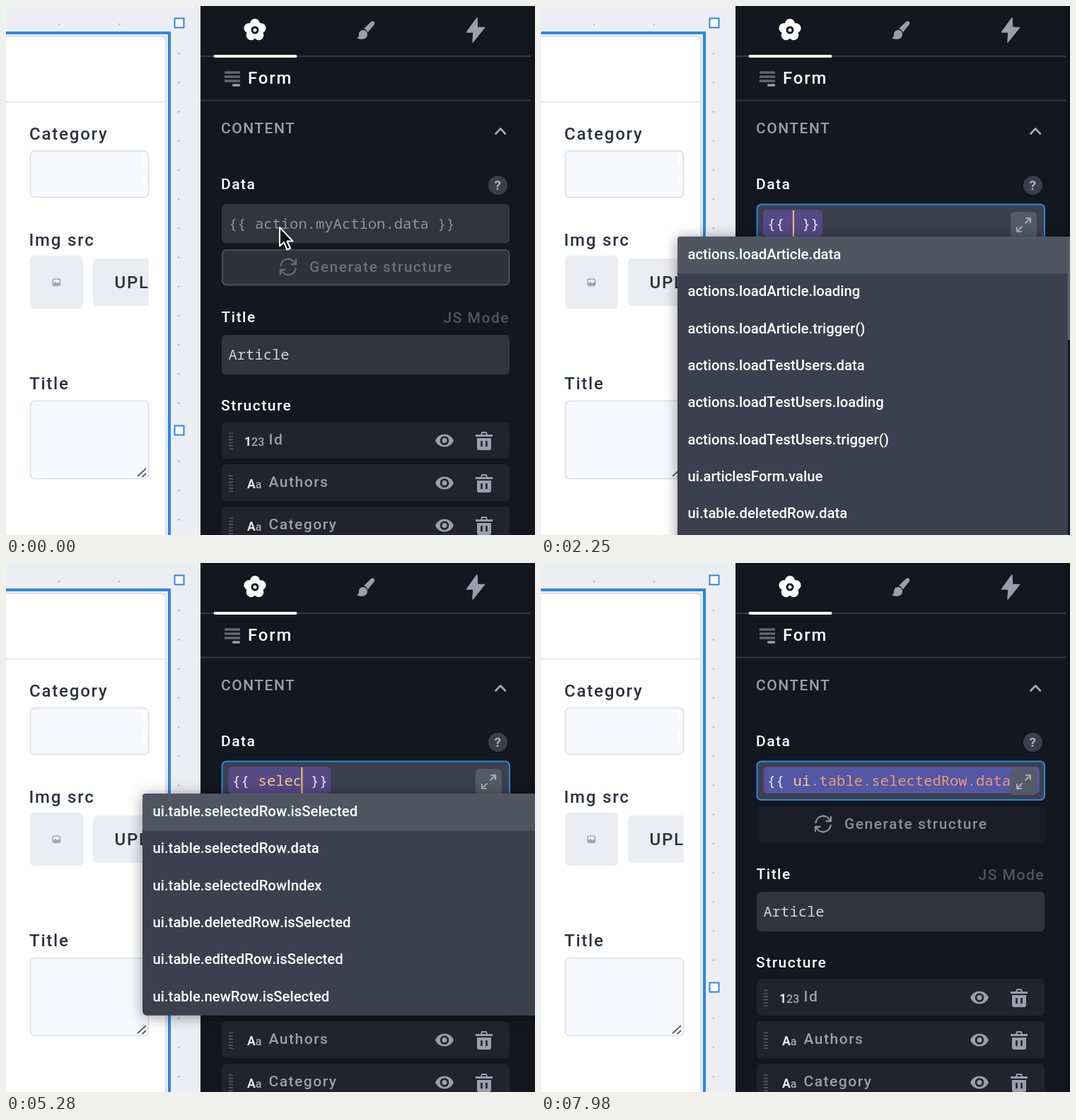
These frames come from a looping animation (748x748 px, 8000 ms). An HTML page:

```html
<!DOCTYPE html>
<html lang="en">
<head>
<meta charset="utf-8">
<title>Form settings</title>
<style>
html, body { margin: 0; height: 100%; overflow: hidden; background: #14171f }
svg { display: block; width: 100vw; height: 100vh }
text { font: 500 21px Roboto, sans-serif; letter-spacing: 1.5px; white-space: pre }
.label { font-size: 24px; letter-spacing: 1.8px; fill: #2d3140 }
.white { fill: #fff }
.grey { fill: #9a9eae }
.code { font: 400 20.5px "Roboto Mono", "Noto Sans Mono", monospace; letter-spacing: 0 }
.type { font-size: 17.5px; font-weight: 700; letter-spacing: 0; fill: #e9eaf0 }
.type tspan { font-size: 16px; font-weight: 500; fill: #a5a8b4 }
.item { font-size: 20.3px; letter-spacing: 0; font-kerning: none; fill: #fff }
.line { fill: none; stroke-linecap: round; stroke-linejoin: round }
.var { fill: #f3c97d }
.prop { fill: #eb9a76 }
.dot { fill: #b9a0a8 }
#shade { filter: blur(10px) }
</style>
</head>
<body>
<svg viewBox="0 0 748 748">
  <defs>
    <g id="handle"><rect x="-6.5" y="-6.5" width="13" height="13" fill="#fff" stroke="#2b87e3" stroke-width="2"/></g>
    <g id="eye">
      <path d="M-13 0C-8-12 8-12 13 0C8 12-8 12-13 0Z" fill="#9a9eae"/>
      <circle r="5" fill="#9a9eae" stroke="#21242d" stroke-width="2.6"/>
    </g>
    <g id="trash" fill="#9a9eae">
      <path d="M-12-9h7l1.5-4h7l1.5 4h7v3h-24zM-10-4h20v14q0 3-3 3h-14q-3 0-3-3z"/>
      <path d="M-3.5 0v8M3.5 0v8" stroke="#21242d" stroke-width="2.6"/>
      <path d="M-3-9l1-2h4l1 2z" fill="#21242d"/>
    </g>
    <clipPath id="fields"><rect width="202" height="748"/></clipPath>
  </defs>

  <!-- page canvas -->
  <rect width="275" height="748" fill="#edeef3"/>
  <g id="dots" fill="#bfc2cc"></g>
  <rect x="-10" y="43" width="236" height="720" rx="6" fill="#fff" stroke="#d5d8e2" stroke-width="1.5"/>
  <path d="M0 135.5H225" stroke="#e5e7ed" stroke-width="2"/>
  <path d="M0 38H231V748" fill="none" stroke="#2b87e3" stroke-width="4"/>
  <use href="#handle" x="245" y="24"/>
  <use href="#handle" x="245" y="600"/>
  <text class="label" x="33" y="189">Category</text>
  <text class="label" x="32.5" y="338.5">Img src</text>
  <text class="label" x="33" y="542">Title</text>
  <g fill="#f8f9fe" stroke="#dadeeb" stroke-width="1.6">
    <rect x="34.5" y="205" width="167" height="65.5" rx="6"/>
    <rect x="34.5" y="558.5" width="167" height="110" rx="6"/>
  </g>
  <path d="M195 208v17M195 238v17" stroke="#fff" stroke-width="3"/>
  <path d="M186 665l12-11M192.5 666l5.500-5" stroke="#555962" stroke-width="1.7"/>
  <g clip-path="url(#fields)">
    <rect x="34" y="353" width="75" height="75" rx="6" fill="#ecedf3"/>
    <rect x="123" y="357" width="100" height="67" rx="6" fill="#ecedf3"/>
    <text class="label" x="153.5" y="399">UPL</text>
  </g>
  <rect x="66" y="386" width="10.5" height="9.5" rx="2.5" fill="none" stroke="#a3a7b4" stroke-width="1.5"/>
  <path d="M66 393l3.5-3 3 2 4-2v5h-10z" fill="#a3a7b4"/>

  <!-- settings panel -->
  <rect x="275" width="473" height="748" fill="#14171f"/>
  <rect x="742" width="6" height="748" fill="#11141b"/>
  <path d="M275 71H742M275 133.5H742" stroke="#343842" stroke-width="2"/>
  <rect x="293.5" y="69" width="118" height="4" rx="2" fill="#fff"/>
  <g id="flower" transform="translate(352 34)" fill="#fff"><circle r="12"/></g>
  <circle cx="352" cy="34" r="4" fill="#fff" stroke="#14171f" stroke-width="3"/>
  <g fill="#9a9eae">
    <path d="M496 45c3-1 3-3 3-5c0-4 3-6 6-6c4 0 6 3 6 6c0 5-4 7-8 7c-3 0-6-1-7-2z"/>
    <path d="M506 32l10.5-10q2-1.500 4 .5q1.500 2 0 4l-9 11q-1-4-5.500-5.500z"/>
    <path d="M666 17l-14.5 20h9.5l-1 14l16.5-20.5h-10z" stroke="#9a9eae" stroke-width="1.5" stroke-linejoin="round"/>
  </g>
  <path d="M309 94h22M309 100h22M309 106h22" stroke="#626672" stroke-width="3.4"/>
  <path d="M321.5 112h8" class="line" stroke="#9a9eae" stroke-width="3.4"/>
  <text class="label" x="342" y="110" style="fill:#fff">Form</text>
  <text class="grey" x="304" y="179.5">CONTENT</text>
  <path class="line" d="M692.5 180.5l6.7-7l6.7 7" stroke="#a5a9b6" stroke-width="2.7"/>
  <text class="white" x="304" y="259">Data</text>
  <circle cx="695.5" cy="253.5" r="13.5" fill="#3b3f4b"/>
  <text x="690.5" y="260" fill="#adb1be" style="font-size:19px;font-weight:700;letter-spacing:0">?</text>

  <g id="generate">
    <rect x="306" y="345" width="405.5" height="49.5" rx="6" stroke-width="2"/>
    <path class="line" d="M388.5 367a10.5 10.5 0 0 1 20-3m1.5-5v6h-6.5M409.5 371a10.5 10.5 0 0 1-20 3m-1.5 5v-6h6.5" stroke-width="2.4"/>
    <text x="429" y="375.5">Generate structure</text>
  </g>

  <text class="white" x="304.5" y="447">Title</text>
  <text x="618.5" y="448" fill="#50545f">JS Mode</text>
  <rect x="305" y="465" width="407" height="56" rx="6" fill="#32353f"/>
  <text class="code" x="314.5" y="500" fill="#d2d3d8">Article</text>
  <text class="white" x="304" y="571.5">Structure</text>
  <g id="rows"></g>

  <!-- data field -->
  <rect id="field" x="305" y="280" width="407" height="55.5" rx="6"/>
  <rect id="outline" x="305.5" y="280.5" width="406.5" height="54.5" rx="6" fill="none" stroke="#2b87e3" stroke-width="2"/>
  <text id="hint" class="code" x="315" y="315" fill="#8f929e">{{ action.myAction.data }}</text>
  <g id="chip">
    <rect id="pill" x="314" y="288" height="38" rx="6" fill="#564a86"/>
    <rect id="marked" x="317" y="289" width="387" height="36" rx="3" fill="#5457a4"/>
    <text id="value" class="code" x="319.7" y="315" fill="#ebe8f3"></text>
  </g>
  <rect id="caret" y="289" width="2" height="37" fill="#f4c56a"/>
  <g id="expand">
    <rect x="664" y="291" width="37" height="37" rx="6" fill="#555a66"/>
    <path class="line" d="M685 307l7-7m-6 0h6v6M680 312l-7 7m6 0h-6v-6" stroke="#a5a9b5" stroke-width="2.2"/>
  </g>

  <g id="menu">
    <rect id="shade" x="193" y="328" width="570" opacity=".4"/>
    <rect id="sheet" x="193" y="326" width="570" rx="6" fill="#3c404e"/>
    <rect id="active" x="193" width="570" height="52.5" rx="4" fill="#505562"/>
    <g id="items"></g>
    <g id="scroll">
      <rect x="745" y="326" width="3" height="422" fill="#14171f"/>
      <rect x="744.5" y="326" width="4" height="146" fill="#5a5e6a"/>
    </g>
  </g>

  <circle id="ring" cx="386" cy="315" fill="none" stroke="#c8c9ce" stroke-width="6"/>
  <path id="pointer" d="M387 313v26.5l6-5.500 4.500 10.500 4.500-2-4.500-10h8z" fill="#0b0c10" stroke="#fff" stroke-width="2" stroke-linejoin="round"/>
</svg>
<script>
const $ = id => document.getElementById(id);
const set = (id, attrs) => { for (const k in attrs) $(id).setAttribute(k, attrs[k]); };
const show = (id, on) => { $(id).style.display = on ? '' : 'none'; };
const ramp = (t, from, to) => Math.min(1, Math.max(0, (t - from) / (to - from)));

const CHAR = 12.3, ROW = 52.3, LOOP = 8000;
const FOCUS = 840, BRACES = 2070, OPEN = 2250, DOWN = 5730, PICK = 5970, MARK = 6300;
const typed = [[2700, 's'], [3000, 'se'], [3300, 'sel'], [3600, 'sele'], [4980, 'selec'], [PICK, 'ui.table.selectedRow.data']];

const options = ['loadArticle', 'loadTestUsers']
  .flatMap(name => ['data', 'loading', 'trigger()'].map(end => `actions.${name}.${end}`))
  .concat('ui.articlesForm.value', 'ui.table.deletedRow.data')
  .concat(['selectedRow.isSelected', 'selectedRow.data', 'selectedRowIndex',
    'deletedRow.isSelected', 'editedRow.isSelected', 'newRow.isSelected'].map(s => 'ui.table.' + s));

const dot = (x, y) => `<circle cx="${x}" cy="${y}" r="1.5"/>`;
$('dots').innerHTML = dot(75, 26) + dot(160, 26) +
  Array.from({ length: 17 }, (_, i) => dot(244, 67 + i * 41.2)).join('');

for (let i = 0; i < 5; i++)
  $('flower').innerHTML += `<circle cy="-9" r="7" transform="rotate(${i * 72})"/>`;

$('rows').innerHTML = ['Id', 'Authors', 'Category'].map((name, i) => `
  <g transform="translate(0 ${588 + i * 60})">
    <rect x="305" width="407" height="52" rx="6" fill="#21242d"/>
    <path d="M318 15.5v24" stroke="#555965" stroke-width="6" stroke-dasharray="1.6 2.8"/>
    <text class="type" x="${i ? 341 : 337}" y="34">${i ? 'A<tspan>a</tspan>' : '1<tspan>23</tspan>'}</text>
    <text class="grey" x="371.5" y="32">${name}</text>
    <use href="#eye" x="620" y="26.5"/>
    <use href="#trash" x="676" y="27"/>
  </g>`).join('');

const span = (cls, s) => `<tspan class="${cls}">${s}</tspan>`;
const paint = code => code.split('.')
  .map((word, i) => span(i ? 'prop' : 'var', word)).join(span('dot', '.'));

function suggest(code) {
  const list = options.filter(s => s.toLowerCase().includes(code));
  const height = Math.min(9, list.length) * ROW;
  set('sheet', { height });
  set('shade', { height });
  show('scroll', list.length > 8);
  $('items').innerHTML = list.map((s, i) =>
    `<text class="item" x="207.5" y="${358 + i * ROW}">${s}</text>`).join('');
}

let shown;

function draw(t) {
  const picked = t >= PICK, braces = t >= BRACES;
  const code = typed.reduce((last, [at, s]) => t >= at ? s : last, '');
  if (code !== shown) {
    $('value').innerHTML = '{{ ' + paint(code) + ' }}';
    suggest(code);
    shown = code;
  }

  // click
  const click = ramp(t, 690, 1410);
  show('ring', click > 0 && click < 1);
  set('ring', { r: 4 + 62 * (1 - (1 - click) ** 3), opacity: 1 - click });
  show('pointer', t < 1680);

  // field
  const glow = ramp(t, FOCUS, 1140);
  const mix = (a, b) => Math.round(a + (b - a) * glow);
  set('field', { fill: `rgb(${mix(50, 60)},${mix(53, 64)},${mix(63, 77)})` });
  set('outline', { opacity: glow });
  show('hint', !braces);
  show('chip', braces);
  set('pill', { width: (code.length + 6) * CHAR + 10 });
  set('marked', { opacity: ramp(t, MARK, 7080) });
  show('caret', t >= FOCUS && t < MARK);
  set('caret', { x: braces ? 319 + (code.length + 3) * CHAR : 314 });
  show('expand', t >= FOCUS);

  // suggestions
  show('menu', t >= OPEN && !picked);
  set('active', { y: 326 + (t >= DOWN ? ROW : 0) });

  // button
  const [box, icon, label] = $('generate').children;
  box.setAttribute('fill', picked ? '#1b1e28' : '#2f323c');
  box.setAttribute('stroke', picked ? '#1b1e28' : '#4a4d57');
  icon.setAttribute('stroke', picked ? '#8b8f9d' : '#666a76');
  label.setAttribute('fill', picked ? '#8b8f9d' : '#6b6f7b');
}

const start = performance.now();
function tick() {
  draw((performance.now() - start) % LOOP);
  requestAnimationFrame(tick);
}
tick();
</script>
</body>
</html>
```
